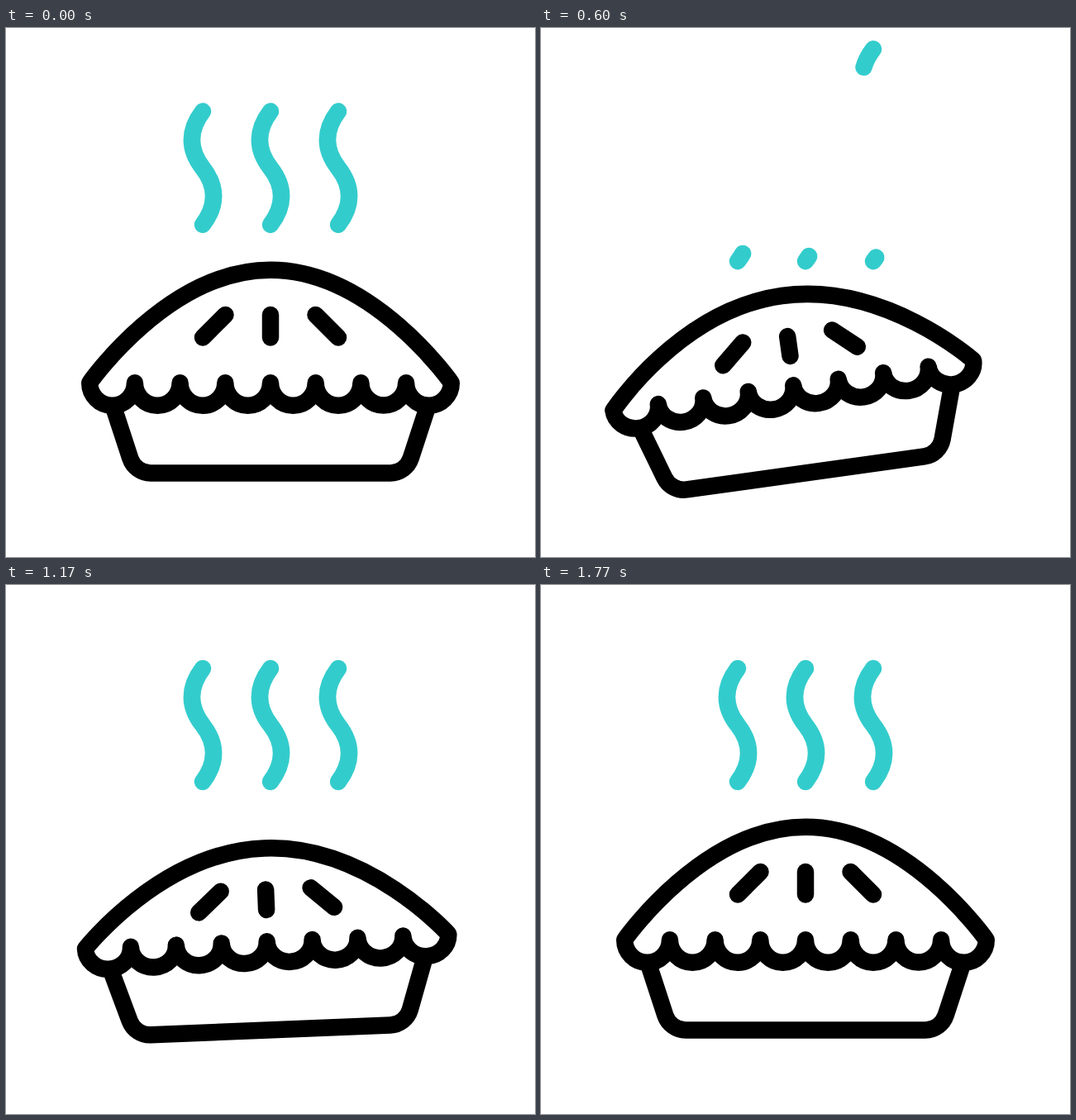
An HTML page that plays this animation: 640 px wide and 640 px high, repeating every 2 s.

```html
<!DOCTYPE html>
<html lang="en">
<head>
<meta charset="utf-8">
<title>Steaming pie</title>
<style>
  html, body { margin: 0; width: 100%; height: 100%; overflow: hidden; background: #fff; }
  svg { display: block; width: 100%; height: 100%; }
  path { fill: none; stroke-width: 20.5; stroke-linecap: round; stroke-linejoin: round; }
  #pie path { stroke: #000; }
  #steam path { stroke: #33cccc; }
</style>
</head>
<body>
<svg viewBox="0 0 640 640">
  <g id="steam"></g>
  <g id="pie">
    <path d="M130.5 460L150.3 520.6A26 26 0 0 0 175 538.4H465A26 26 0 0 0 489.7 520.6L509.5 460"/>
    <path id="crust"/>
    <path id="slits"/>
  </g>
</svg>
<script>
const LOOP = 2000;
const $ = id => document.getElementById(id);
const pie = $('pie'), crust = $('crust'), slits = $('slits'), steam = $('steam');

const span = (t, a, b) => Math.min(1, Math.max(0, (t - a) / (b - a)));
const ease = u => u * u * (3 - 2 * u);
const smooth = (t, a, b) => ease(span(t, a, b));

// [time, degrees]
const ROCK = [[125, 0], [495, -14.6], [800, 9.4], [1040, -5], [1290, 0]];

// x, leaving from/to, arriving from/to
const WISPS = [
  [238, 60, 478, 533, 942],
  [320, 108, 566, 535, 1030],
  [402, 90, 780, 531, 1140]
].map(([x, ...times]) => ({ times, leaving: addWisp(x), arriving: addWisp(x) }));

function addWisp(x) {
  const p = document.createElementNS('http://www.w3.org/2000/svg', 'path');
  p.setAttribute('d', `M${x} 101c-17.6 23-17.6 46 0 68.5s17.6 45.5 0 68.5`);
  p.setAttribute('pathLength', 1);
  return steam.appendChild(p);
}

function showWisp(p, from, to, dy) {
  const len = to - from;
  p.style.display = len > 0.0005 ? '' : 'none';
  p.setAttribute('stroke-dasharray', `${len} 3`);
  p.setAttribute('stroke-dashoffset', -from);
  p.setAttribute('transform', `translate(0 ${dy})`);
}

function rockAngle(t) {
  let angle = 0;
  for (let i = 1; i < ROCK.length; i++) {
    const [t0, a0] = ROCK[i - 1], [t1, a1] = ROCK[i];
    if (t >= t0) angle = a0 + (a1 - a0) * smooth(t, t0, t1);
  }
  return angle;
}

function drawPie(t) {
  // The crust sinks, spreads a little, then swells back
  const sink = 36.5 * (smooth(t, 0, 840) - smooth(t, 840, 1750));
  const drift = 0.04 * sink;
  const top = 292.8 + sink, rim = 429.3 + 0.07 * sink;
  const half = 218.8 + drift, left = 320 - half, right = 320 + half;
  const scallop = `a${half / 8} ${27.35 - 0.06 * sink} 0 0 1 ${-half / 4} 0`;
  crust.setAttribute('d',
    `M${left} ${rim}C${left} ${rim} 196 ${top} ${320 + drift} ${top}S${right} ${rim} ${right} ${rim}` +
    scallop.repeat(8) + 'Z');

  const y0 = 347 + 0.84 * sink, y1 = 374.6 + 0.72 * sink;
  slits.setAttribute('d',
    `M265.5 ${y0}L238 ${y1}M320 ${y0}V${y1}M374.5 ${y0}L402 ${y1}`);
  slits.setAttribute('transform', `translate(${drift} 0)`);
  pie.setAttribute('transform', `rotate(${rockAngle(t)} 320 538.5)`);
}

function drawSteam(t) {
  const rise = -75.6 * span(t, 0, 600);
  const below = 49.9 * (1 - span(t, 530, 1143));
  for (const { times: [out0, out1, in0, in1], leaving, arriving } of WISPS) {
    showWisp(leaving, 0, 1 - smooth(t, out0, out1), rise);
    showWisp(arriving, 1 - smooth(t, in0, in1), 1, below);
  }
}

function frame() {
  const t = performance.now() % LOOP;
  drawPie(t);
  drawSteam(t);
  requestAnimationFrame(frame);
}
frame();
</script>
</body>
</html>
```
